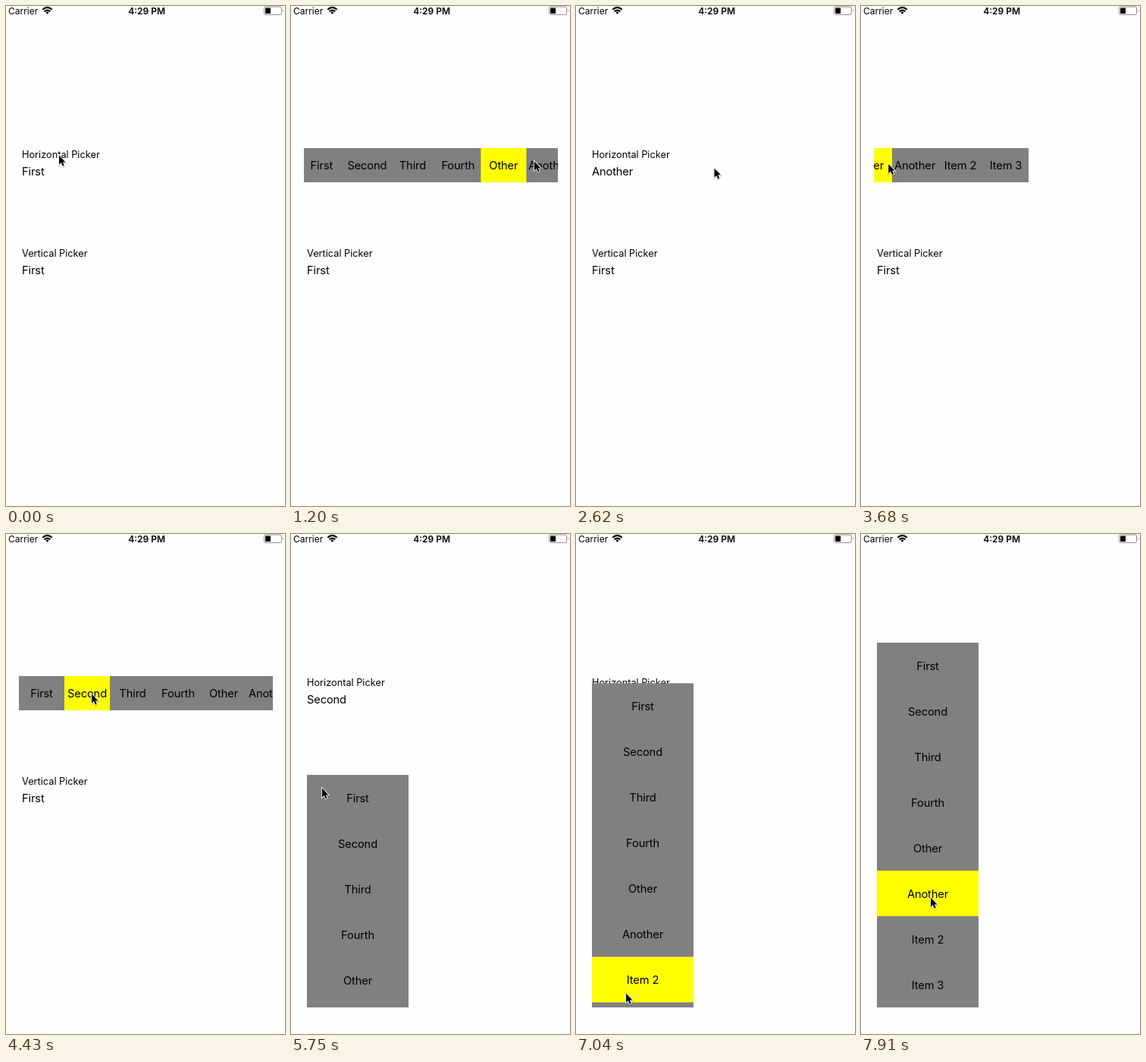
These frames come from a looping animation (368 by 658 pixels, 8 s). An HTML page:

```html
<!DOCTYPE html>
<html lang="en">
<head>
<meta charset="utf-8">
<title>Horizontal and vertical pickers</title>
<style>
  html, body { margin: 0; width: 100%; height: 100%; overflow: hidden; background: #fefefe; }
  svg { display: block; width: 368px; height: 658px; }
  text { font-family: Inter, "Liberation Sans", sans-serif; font-size: 14.7px; letter-spacing: -.15px; fill: #000; }
  .label { font-size: 12.75px; letter-spacing: 0; }
  .status { font-size: 12px; letter-spacing: 0; }
  .time { font-weight: 600; text-anchor: middle; }
  .cell { text-anchor: middle; }
  .panel { fill: #808080; }
  .hot { fill: #ff0; }
  #cursor { filter: drop-shadow(0 1px .7px rgba(0, 0, 0, .3)); }
</style>
</head>
<body>
<svg viewBox="0 0 368 658">
  <defs>
    <clipPath id="hClip"><rect x="17" y="187" width="335" height="45"/></clipPath>
    <clipPath id="vClip"><rect x="21" y="143" width="134" height="480"/></clipPath>
  </defs>

  <text class="status" x="3" y="10.7">Carrier</text>
  <g fill="none" stroke="#000" stroke-width="2.1">
    <path d="M48.3 4.8Q54.5 -.9 60.7 4.8"/>
    <path d="M50.6 7.3Q54.5 3.8 58.4 7.3"/>
    <path d="M52.4 8.4Q54.5 6.8 56.6 8.4L54.5 10.8Z" fill="#000" stroke="none"/>
  </g>
  <text class="status time" x="185.7" y="10.7">4:29 PM</text>
  <rect x="340.5" y="1" width="23" height="10.4" rx="2" fill="none" stroke="#8a8a8a"/>
  <rect x="342" y="2.5" width="7" height="7.4" rx=".6"/>
  <path d="M365 4.3Q366.8 6.2 365 8.1Z" fill="#777"/>

  <text class="label" x="21" y="199.5">Horizontal Picker</text>
  <text id="hValue" x="21" y="223">First</text>
  <text class="label" x="21" y="329.5">Vertical Picker</text>
  <text x="21" y="353">First</text>

  <g id="hPicker" clip-path="url(#hClip)"><g></g></g>
  <g id="vPicker" clip-path="url(#vClip)"><g></g></g>

  <g id="cursor">
    <path d="M1 1.5V13.7L3.8 11.1L5.8 15.6L7.8 14.7L5.8 10.4H9.5Z" stroke="#fff" stroke-width="1.7" paint-order="stroke"/>
  </g>
</svg>
<script>
const LOOP = 8000, CELL = 60, SPEED = .6, LAG = 50;
const ITEMS = ['First', 'Second', 'Third', 'Fourth', 'Other', 'Another', 'Item 2', 'Item 3'];
const LENGTH = CELL * ITEMS.length;

const START = { x: 69, y: 195 };
const MOVES = [
  { from: 540, to: 1200, x: 320, y: 203 },   // drag to the right edge
  { from: 1680, to: 2210, x: 203, y: 215 },  // back to "Another"
  { from: 2560, to: 2920, x: 76, y: 197 },   // return to the field
  { from: 3340, to: 3700, x: 33, y: 207 },   // drag to the left edge
  { from: 4190, to: 4430, x: 112, y: 209 },  // onto "Second"
  { from: 4970, to: 5510, x: 40, y: 333 },   // to the vertical field
  { from: 5990, to: 6270, x: 45, y: 422 },   // drag down
  { from: 6450, to: 7040, x: 65, y: 603 },   // to the bottom edge
  { from: 7440, to: 7910, x: 91, y: 477 }    // up to "Another"
];

const byId = id => document.getElementById(id);
const clamp = (v, lo, hi) => Math.min(hi, Math.max(lo, v));

function add(parent, tag, attrs, label = '') {
  const el = document.createElementNS('http://www.w3.org/2000/svg', tag);
  for (const k in attrs) el.setAttribute(k, attrs[k]);
  el.textContent = label;
  return parent.appendChild(el);
}

// axis is the scrolling direction, 'x' or 'y'
function makePicker(id, axis, origin, width, height) {
  const root = byId(id), strip = root.firstElementChild;
  const side = axis === 'x' ? 'width' : 'height';
  add(strip, 'rect', { class: 'panel', width, height, [side]: LENGTH });
  const hot = add(strip, 'rect', { class: 'hot', width, height });
  ITEMS.forEach((item, i) => {
    const pos = { x: width / 2, y: height / 2 + 5.6 };
    pos[axis] += i * CELL;
    add(strip, 'text', { class: 'cell', ...pos }, item);
  });

  return (t, open, touched, scroll, cursor) => {
    root.style.display = open ? '' : 'none';
    hot.style.display = touched ? '' : 'none';
    const at = Math.floor((cursor[axis] - origin[axis] + scroll(t - LAG)) / CELL);
    hot.setAttribute(axis, clamp(at, 0, ITEMS.length - 1) * CELL);
    const pos = { ...origin };
    pos[axis] -= scroll(t);
    strip.setAttribute('transform', `translate(${pos.x} ${pos.y})`);
  };
}

const drawH = makePicker('hPicker', 'x', { x: 17, y: 187 }, CELL, 45);
const drawV = makePicker('vPicker', 'y', { x: 21, y: 317 }, 134, CELL);

// Holding the cursor at an edge scrolls at a constant speed
const scrollRight = t => clamp(SPEED * (t - 1150) - 24, -24, LENGTH - 335);
const scrollLeft = t => clamp(276 - SPEED * (t - 3710), 0, 276);
const scrollDown = t => clamp(SPEED * (t - 6840), 0, 174);

function cursorAt(t) {
  const pos = { ...START };
  for (const m of MOVES) {
    const f = clamp((t - m.from) / (m.to - m.from), 0, 1);
    pos.x += (m.x - pos.x) * f;
    pos.y += (m.y - pos.y) * f;
  }
  return pos;
}

function draw(ms) {
  const t = ms % LOOP, cursor = cursorAt(t);
  const first = t >= 540 && t < 2390, second = t >= 3160 && t < 4730;
  drawH(t, first || second, first ? t >= 600 : t >= 3400, first ? scrollRight : scrollLeft, cursor);
  drawV(t, t >= 5750, t >= 6050, scrollDown, cursor);
  byId('hValue').textContent = t < 2390 ? 'First' : t < 4730 ? 'Another' : 'Second';
  byId('cursor').setAttribute('transform', `translate(${cursor.x} ${cursor.y})`);
}

function tick(ms) {
  draw(ms);
  requestAnimationFrame(tick);
}
draw(0);
requestAnimationFrame(tick);
</script>
</body>
</html>
```
